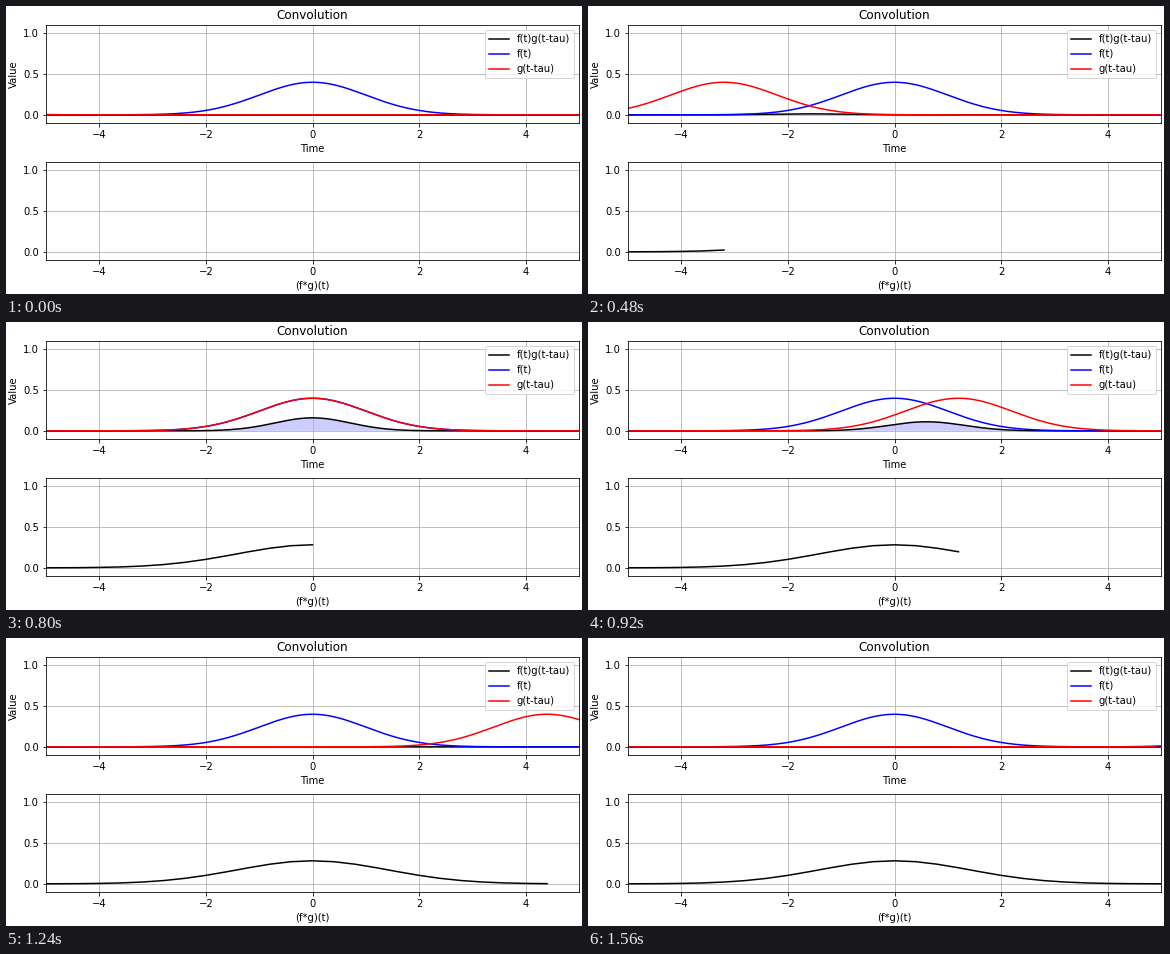
Animation of 576x288 px, one loop 1.6 s. Source, as a matplotlib script:

```python
import numpy as np
import matplotlib.pyplot as plt
from matplotlib.animation import FuncAnimation

W, H, DPI = 576, 288, 72
FRAMES, INTERVAL = 40, 40
TAU_START, TAU_STEP = -8.0, 0.4

plt.rcParams["font.family"] = "DejaVu Sans"


def gauss(x, var=1.0):
    return np.exp(-x**2 / (2 * var)) / np.sqrt(2 * np.pi * var)


def add_panel(fig, top, bottom):
    """Panel placed by its top and bottom pixel rows."""
    ax = fig.add_axes([40 / W, (H - bottom) / H, 533 / W, (bottom - top) / H])
    ax.set_xlim(-5, 5)
    ax.set_ylim(-0.1, 1.1)
    ax.set_xticks([-4, -2, 0, 2, 4])
    ax.set_yticks([0, 0.5, 1])
    ax.grid(True)
    return ax


fig = plt.figure(figsize=(W / DPI, H / DPI), dpi=DPI, facecolor="white")
upper = add_panel(fig, 19, 117)
lower = add_panel(fig, 156, 254)
upper.set_title("Convolution")
upper.set_xlabel("Time")
upper.set_ylabel("Value")
lower.set_xlabel("(f*g)(t)")

t = np.linspace(-5, 5, 501)
f = gauss(t)
taus = TAU_START + TAU_STEP * np.arange(FRAMES)
# Two unit gaussians convolve to a gaussian of variance 2.
conv = gauss(taus, 2.0)

product_line, = upper.plot([], [], color="black", label="f(t)g(t-tau)")
upper.plot(t, f, color="blue", label="f(t)")
g_line, = upper.plot([], [], color="red", label="g(t-tau)")
area = upper.fill_between(t, 0 * t, facecolor="blue", alpha=0.2)
upper.legend(loc="upper right")
conv_line, = lower.plot([], [], color="black")


def update(i):
    g = gauss(t - taus[i])
    product = f * g
    g_line.set_data(t, g)
    product_line.set_data(t, product)
    outline = np.column_stack([t, product])
    area.set_verts([np.vstack([[t[0], 0], outline, [t[-1], 0]])])
    conv_line.set_data(taus[:i + 1], conv[:i + 1])
    return product_line, g_line, area, conv_line


anim = FuncAnimation(fig, update, frames=FRAMES, interval=INTERVAL,
                     repeat=True, repeat_delay=0, blit=False)
plt.show()
```
